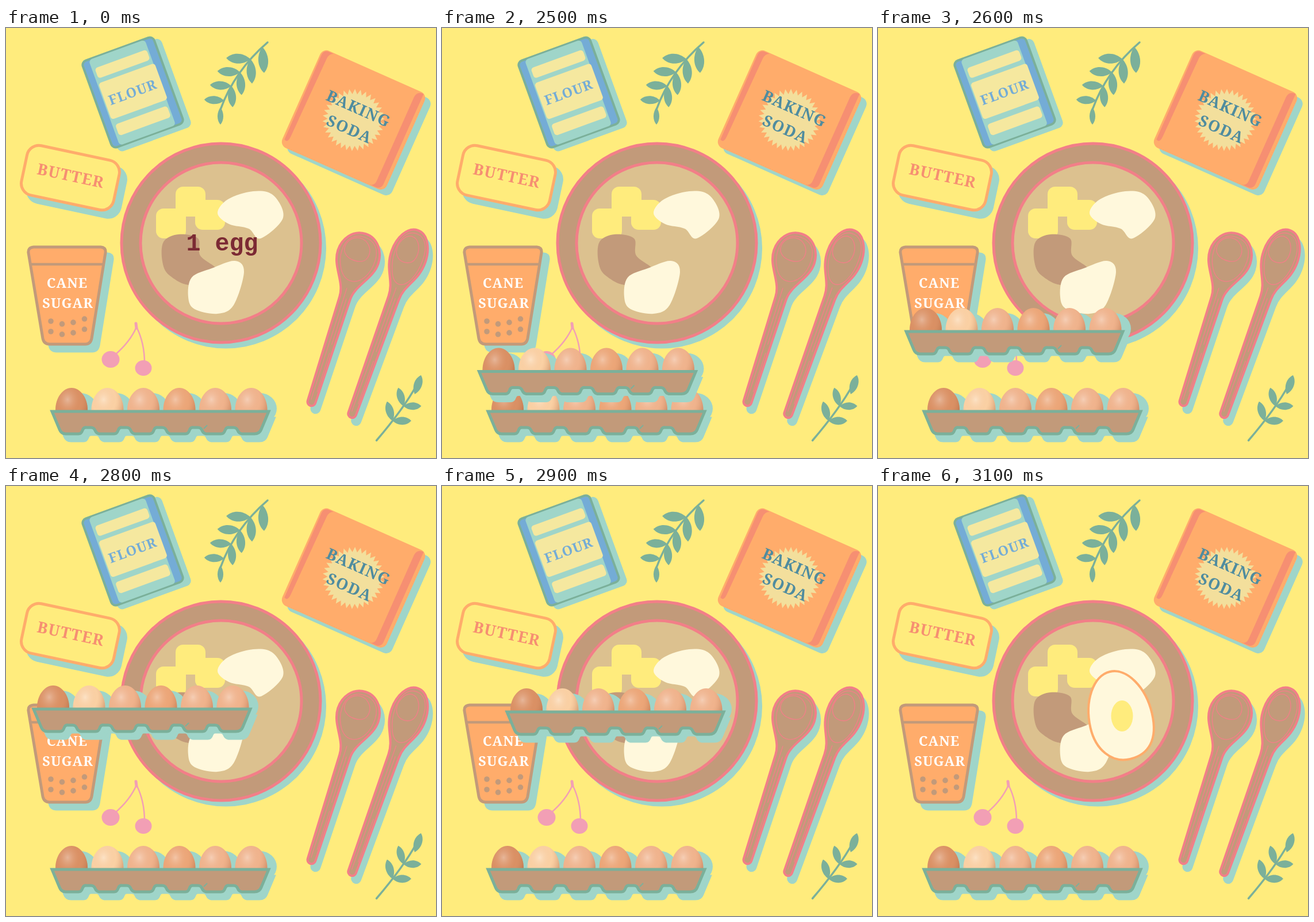
An HTML page for the animation above (3200 ms loop, 748x748 px).

```html
<!DOCTYPE html>
<html lang="en">
<head>
<meta charset="utf-8">
<title>Baking ingredients</title>
<style>
  :root {
    --bg: #ffec7d; --shade: #9fd5c9; --leaf: #7bb09a; --wood: #c29a7a;
    --pink: #f27f88; --orange: #ffac6b; --coral: #f68f72; --blue: #74acd6;
    --cream: #fff8dc; --label: #f5e89f;
  }
  html, body { margin: 0; width: 100%; height: 100%; overflow: hidden; background: var(--bg); }
  svg { display: block; width: 100%; height: 100%; }
  text { font: 700 23.5px "Noto Serif", serif; letter-spacing: 1px; text-anchor: middle; }
  .big { font-size: 27px; letter-spacing: 1.4px; }
  .call { font: 700 41.7px "Liberation Mono", monospace; letter-spacing: 0; }
  .shade { fill: var(--shade); stroke: var(--shade); }
  .wood { fill: var(--wood); stroke: var(--pink); }
  .stem { fill: none; stroke: var(--leaf); stroke-width: 3.5; stroke-linecap: round; }
  .grain { fill: none; stroke: var(--pink); stroke-width: 1.4; stroke-linecap: round; }
</style>
</head>
<body>
<svg viewBox="0 0 748 748">
  <defs>
    <radialGradient id="shine" cx=".38" cy=".3" r=".75">
      <stop offset="0" stop-color="#fff" stop-opacity=".35"/>
      <stop offset=".5" stop-color="#e9a276" stop-opacity=".05"/>
      <stop offset="1" stop-color="#94502c" stop-opacity=".55"/>
    </radialGradient>
    <path id="cup" d="M48 381H165Q174 382 173 391L149 540Q147 550 138 550H76Q66 550 64 540L39 391Q38 382 48 381Z" stroke-width="5"/>
    <g id="carton"></g>
  </defs>

  <!-- flour -->
  <g transform="translate(220.5 112) rotate(-20)">
    <rect class="shade" x="-58" y="-73" width="135" height="163" rx="9" stroke="none"/>
    <rect x="-66" y="-80" width="132" height="160" rx="8" fill="var(--blue)" stroke="var(--leaf)" stroke-width="4"/>
    <rect x="-53" y="-79" width="104" height="158" rx="6" fill="var(--shade)"/>
    <g fill="var(--label)">
      <rect x="-48" y="-62" width="96" height="19" rx="5"/>
      <rect x="-51" y="-35" width="104" height="67" rx="5"/>
      <rect x="-48" y="42" width="96" height="21" rx="5"/>
    </g>
    <text y="8" fill="var(--blue)">FLOUR</text>
  </g>

  <!-- baking soda -->
  <rect x="-99.5" y="-92.5" width="199" height="185" rx="12" fill="var(--shade)" transform="translate(614 170) rotate(24)"/>
  <g transform="translate(604.5 160) rotate(24)">
    <rect x="-99.5" y="-92.5" width="199" height="185" rx="12" fill="var(--orange)"/>
    <path d="M-97 -82Q-96 -91 -86 -91H-78Q-86 -88 -86 -78L-88 70Q-88 84 -96 80Z M91 -91Q80 -90 80 -78V80Q80 91 70 91H84Q93 90 93 80V-91Z" fill="var(--coral)"/>
    <path id="burst" fill="#f3df9c"/>
    <g fill="#4f8c9f">
      <text class="big" y="-12">BAKING</text>
      <text class="big" y="27">SODA</text>
    </g>
  </g>

  <!-- butter -->
  <g stroke-width="5">
    <rect class="shade" x="-82" y="-44" width="164" height="88" rx="21" transform="translate(123 273) rotate(12)"/>
    <rect x="-82" y="-44" width="164" height="88" rx="21" fill="var(--bg)" stroke="var(--orange)" transform="translate(112 260.5) rotate(12)"/>
  </g>
  <text class="big" y="6" fill="var(--coral)" transform="translate(112 260.5) rotate(12)">BUTTER</text>

  <!-- bowl -->
  <circle cx="382.500" cy="383" r="174.500" fill="var(--shade)"/>
  <g stroke="var(--pink)" stroke-width="5">
    <circle cx="374" cy="374" r="173" fill="var(--wood)"/>
    <circle cx="374" cy="374" r="140" fill="#dcc18f"/>
  </g>
  <g fill="var(--bg)">
    <rect x="295" y="276" width="52" height="52" rx="13"/>
    <rect x="261" y="314" width="52" height="52" rx="13"/>
    <rect x="329" y="299" width="52" height="52" rx="13"/>
  </g>
  <g id="mix"></g>

  <!-- sugar -->
  <use href="#cup" class="shade" transform="translate(12 12)"/>
  <use href="#cup" fill="var(--orange)" stroke="var(--wood)"/>
  <path d="M42 411H170" stroke="var(--wood)" stroke-width="4.5"/>
  <g id="dots" fill="var(--wood)"></g>
  <text x="106.500" y="452" fill="#fff">CANE</text>
  <text x="107.500" y="487" fill="#fff">SUGAR</text>

  <!-- cherries -->
  <g fill="#f29fb5">
    <g fill="none" stroke="#f29fb5" stroke-linecap="round">
      <path d="M227 520Q216 546 189 569M227 520Q241 548 241 583" stroke-width="2.5"/>
      <path d="M226 514L227 522" stroke-width="5"/>
    </g>
    <ellipse cx="182" cy="576.5" rx="15.5" ry="14.500"/>
    <ellipse cx="239" cy="591.5" rx="14.5" ry="13.5"/>
  </g>

  <g id="spoons" stroke-width="4"></g>
  <g id="sprigs"></g>
  <use href="#carton"/>
  <g id="egg"></g>
  <text id="call" class="call" x="376" y="387" fill="#7c2a34">1 egg</text>
  <use id="mover" href="#carton"/>
</svg>

<script>
const $ = id => document.getElementById(id);

function add(parent, tag, attrs) {
  const el = document.createElementNS("http://www.w3.org/2000/svg", tag);
  for (const k in attrs) el.setAttribute(k, attrs[k]);
  return parent.appendChild(el);
}

// Closed smooth curve through key points given as x, y, x, y ...
function blob(fill, ...list) {
  const n = list.length / 2;
  const at = i => list.slice((i + n) % n * 2).slice(0, 2);
  let d = "M" + at(0);
  for (let i = 0; i < n; i++) {
    const [a, b, c, e] = [at(i - 1), at(i), at(i + 1), at(i + 2)];
    const out = b.map((v, k) => v + (c[k] - a[k]) / 6);
    const into = c.map((v, k) => v - (e[k] - b[k]) / 6);
    d += `C${out},${into},${c}`;
  }
  add($("mix"), "path", { d: d + "Z", fill });
}

// Egg outline, wider below the middle
function eggShape(x, y, rx, ry, low = .12) {
  const m = y + ry * low;
  return `M${x - rx} ${m}C${x - rx} ${m - ry * .6} ${x - rx * .55} ${y - ry} ${x} ${y - ry}` +
    `S${x + rx} ${m - ry * .6} ${x + rx} ${m}S${x + rx * .6} ${y + ry} ${x} ${y + ry}S${x - rx} ${m + ry * .5} ${x - rx} ${m}Z`;
}

function leaf(x, y, dx, dy, w) {
  const len = Math.hypot(dx, dy), nx = -dy / len * w * .67, ny = dx / len * w * .67;
  const p = (t, s) => `${x + dx * t + nx * s} ${y + dy * t + ny * s}`;
  add($("sprigs"), "path", {
    d: `M${x} ${y}C${p(.3, 1)} ${p(.75, 1)} ${p(1, 0)}C${p(.75, -1)} ${p(.3, -1)} ${x} ${y}Z`, fill: "var(--leaf)"
  });
}

// Leaves a and b sit at even steps along a curved stem; b may lag behind a
function sprig({ stem: [p, c, q], first, step, count, lag, a, b, w, taper }) {
  const at = t => [0, 1].map(k => (1 - t) ** 2 * p[k] + 2 * t * (1 - t) * c[k] + t * t * q[k]);
  add($("sprigs"), "path", { d: `M${p}Q${c} ${q}`, class: "stem" });
  for (let i = 0; i < count; i++) {
    const t = first + i * step, s = 1 - taper * i;
    leaf(...at(t), a[0] * s, a[1] * s, w * s);
    leaf(...at(t + lag), b[0] * s, b[1] * s, w * s);
  }
}

function spoon(x, y, turn, w, top, len) {
  const side = s => `${s * 9.5} 48 ${s * 9.5} 76`;
  const d = `M0 ${-top}C${w * .62} ${-top} ${w} ${-top * .5} ${w} 0C${w} ${top * .7} ${side(1)}L7 ${len}` +
    `A7 7 0 0 1 -7 ${len}L-9.5 76C-9.5 48 ${-w} ${top * .7} ${-w} 0C${-w} ${-top * .5} ${-w * .62} ${-top} 0 ${-top}Z`;
  const pose = `translate(${x} ${y}) rotate(${turn})`;
  add($("spoons"), "path", { d, class: "shade", transform: "translate(7 12) " + pose });
  const g = add($("spoons"), "g", { transform: pose });
  add(g, "path", { d, class: "wood" });
  add(g, "path", { d: eggShape(0, 4, w * .82, top * .95, -.15), class: "grain" });
  add(g, "path", { d: eggShape(-5, -12, w * .6, top * .48), class: "grain" });
  add(g, "path", { d: `M-2 58V${len - 4}M3 76V${len * .6}M4 ${len * .66}V${len - 20}`, class: "grain" });
}

// Starburst
const spikes = 34, ring = [];
for (let i = 0; i < spikes * 2; i++) {
  const a = i * Math.PI / spikes, r = i % 2 ? 45 : 54;
  ring.push([r * Math.sin(a), -r * Math.cos(a)]);
}
$("burst").setAttribute("d", "M" + ring.join("L") + "Z");

blob("var(--cream)", 368, 322, 386, 298, 430, 284, 465, 291, 482, 330, 443, 366, 422, 349, 388, 341);
blob("var(--wood)", 274, 372, 300, 359, 334, 366, 338, 396, 367, 423, 322, 447, 284, 430, 272, 406);
blob("var(--cream)", 323, 434, 358, 418, 398, 405, 414, 424, 396, 482, 368, 497, 328, 489, 317, 468);

add($("egg"), "path", {
  d: eggShape(0, 0, 55, 78), transform: "translate(421 399) rotate(-13)",
  fill: "var(--cream)", stroke: "var(--orange)", "stroke-width": 4
});
add($("egg"), "ellipse", { cx: 424.5, cy: 400, rx: 19, ry: 27, fill: "var(--bg)" });

for (let i = 0; i < 8; i++) {
  const col = i % 4, row = i >> 2;
  add($("dots"), "circle", { cx: 78 + 19.5 * col, cy: 510 + 18 * row + 5 * Math.sin(1.35 * col), r: 4.8 });
}

spoon(612.5, 398, 17.8, 37, 42, 265);
spoon(700, 398, 19.7, 31, 49, 290);

sprig({ stem: [[455, 25], [397, 75], [373, 142]], first: .08, step: .2, count: 4, lag: .2,
        a: [3, 45], b: [-42, -2], w: 17, taper: .06 });
leaf(373, 138, 0, 30, 10);
sprig({ stem: [[715, 620], [692, 662], [644.5, 717.5]], first: .42, step: .26, count: 2, lag: 0,
        a: [-9, -32], b: [31, 0], w: 13, taper: -.05 });
leaf(711, 637, 11, -33, 14);

// Egg carton
const box = $("carton"), pitch = 62;
let tray = "M80 667L93 698Q96 706 104 706";
for (let i = 0; i < 5; i++) {
  const x = 144 + i * pitch;
  tray += `H${x - 18}Q${x - 13} 706 ${x - 11} 700T${x - 4} 695H${x + 4}Q${x + 9} 695 ${x + 11} 700T${x + 18} 706`;
}
tray += "H432Q441 706 444 698L457 667Z";

const shells = ["#d98f63", "#fbd3a6", "#f0b48e", "#eca678", "#f0b48e", "#f0b48e"];
const eggX = i => 114 + i * 62.5;
add(box, "path", { d: tray, class: "shade", "stroke-width": 5, transform: "translate(9 12)" });
shells.forEach((_, i) =>
  add(box, "ellipse", { cx: eggX(i) + 15, cy: 662, rx: 29.5, ry: 27, fill: "var(--shade)" }));
shells.forEach((fill, i) => {
  for (const paint of [fill, "url(#shine)"])
    add(box, "path", { d: eggShape(eggX(i), 660, 28, 34), fill: paint });
});
add(box, "path", { d: tray, fill: "var(--wood)", stroke: "var(--leaf)", "stroke-width": 5 });
add(box, "path", { d: "M344 697L350 691", stroke: "var(--leaf)", "stroke-width": 2 });

// The lifted carton passes one stop every two steps, then the egg appears
const LOOP = 3200, LIFT = 2400, STEP = 100;
const stops = [[0, 0], [-31, -139], [-32, -279], [98, -269]];
const crack = (stops.length - 1) * 2;

function place(i) {
  const from = stops[i >> 1], to = stops[i + 1 >> 1];
  return from.map((v, k) => (v + to[k]) / 2);
}

function show(id, on) { $(id).style.display = on ? "" : "none"; }

function draw() {
  const t = performance.now() % LOOP;
  const i = Math.floor((t - LIFT) / STEP);
  const lifted = i >= 0 && i <= crack;
  show("call", i < 0);
  show("mover", lifted);
  show("egg", i > crack);
  if (lifted) $("mover").setAttribute("transform", `translate(${place(i)})`);
  requestAnimationFrame(draw);
}
draw();
</script>
</body>
</html>
```
